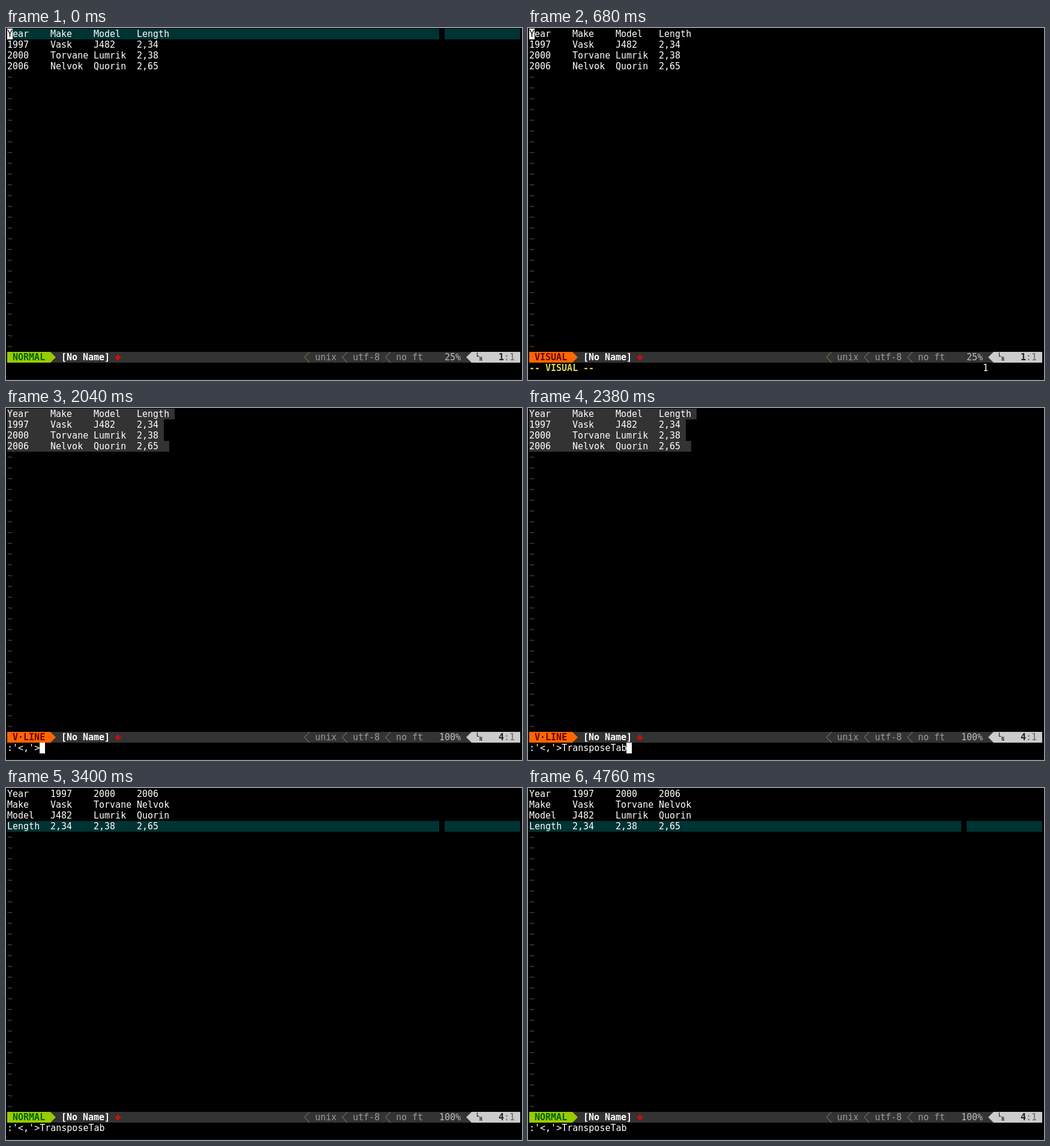
An HTML page for the animation above (5100 ms loop, 860 by 588 pixels).

```html
<!DOCTYPE html>
<html lang="en">
<head>
<meta charset="utf-8">
<title>Transpose table</title>
<style>
  html, body { margin: 0; width: 100%; height: 100%; overflow: hidden; background: #000; }
  svg { display: block; width: 860px; height: 588px; }
  text { font: 15px "DejaVu Sans Mono", monospace; fill: #fff; }
  .bold { font-weight: bold; }
  .tiny { font-size: 8px; font-weight: bold; }
</style>
</head>
<body>
<svg id="screen" viewBox="0 0 860 588"></svg>
<script>
const LOOP = 5100, CW = 9, CH = 18, STATUS = 30, CMD = 31;
const screen = document.getElementById('screen');

const table = [
  ['Year', 'Make', 'Model', 'Length'],
  ['1997', 'Vask', 'J482', '2,34'],
  ['2000', 'Torvane', 'Lumrik', '2,38'],
  ['2006', 'Nelvok', 'Quorin', '2,65']
];
const flipped = table[0].map((_, i) => table.map(row => row[i]));

const modes = {
  normal: { label: 'NORMAL', bg: '#9c0', fg: '#005f00' },
  visual: { label: 'VISUAL', bg: '#f60', fg: '#600' },
  vline: { label: 'V·LINE', bg: '#f60', fg: '#600' }
};

// Each step inherits from the one before it.
const steps = [
  { at: 0, mode: 'normal', rows: table, line: 0, cursor: [0, 0], cmd: '', count: '', selected: false },
  { at: 340, cursor: null },
  { at: 680, mode: 'visual', cursor: [0, 0], cmd: '-- VISUAL --', count: '1' },
  { at: 1020, mode: 'vline', line: 3, cursor: [0, 3], cmd: '-- VISUAL LINE --', count: '4', selected: true },
  { at: 2040, cursor: [6, CMD], cmd: ":'<,'>", count: '' },
  { at: 2380, cursor: [18, CMD], cmd: ":'<,'>TransposeTab" },
  { at: 3060, mode: 'normal', rows: flipped, cursor: [0, 3], selected: false },
  { at: 3400, cursor: null },
  { at: 4080, cursor: [0, 3] },
  { at: 4760, cursor: null }
];
for (let i = 1; i < steps.length; i++) steps[i] = { ...steps[i - 1], ...steps[i] };

const X = col => 2 + col * CW;
const Y = row => 1 + row * CH;

function add(parent, tag, attrs, content) {
  const node = document.createElementNS('http://www.w3.org/2000/svg', tag);
  for (const key in attrs) node.setAttribute(key, attrs[key]);
  if (content) node.textContent = content;
  parent.append(node);
}

function cells(g, col, row, count, fill) {
  add(g, 'rect', { x: X(col), y: Y(row), width: count * CW, height: CH, fill });
}

// Words are anchored to their own terminal column.
function write(g, col, row, str, color = '#fff', cls = '') {
  for (const m of str.matchAll(/\S+/g)) {
    add(g, 'text', { x: X(col + m.index), y: Y(row) + 14, class: cls, style: `fill:${color}` }, m[0]);
  }
}

function drawStatus(g, s) {
  const { label, bg, fg } = modes[s.mode];
  const y = Y(STATUS), mid = y + CH / 2;
  cells(g, 0, STATUS, 95, '#333');
  cells(g, 0, STATUS, 8, bg);
  add(g, 'path', { d: `M${X(8)} ${y}L${X(9)} ${mid}L${X(8)} ${y + CH}Z`, fill: bg });
  write(g, 1, STATUS, label, fg, 'bold');
  write(g, 10, STATUS, '[No Name]', '#fff', 'bold');
  add(g, 'path', { d: 'M185 546h3v3h-3zM185 552h3v3h-3zM182 549h4v3h-4zM187 549h4v3h-4z', fill: '#f00' });

  [[55, 'unix', '#a98158'], [62, 'utf-8', '#8088b8'], [70, 'no ft', '#8088b8']].forEach(([col, str, stroke]) => {
    add(g, 'path', { d: `M${X(col + 1)} ${y}L${X(col) + .5} ${mid}L${X(col + 1)} ${y + CH}`, fill: 'none', stroke });
    write(g, col + 2, STATUS, str, '#999');
  });

  write(g, 80, STATUS, (s.line ? '100%' : '25%').padStart(4), '#bcbcbc');
  cells(g, 86, STATUS, 9, '#ccc');
  add(g, 'path', { d: `M${X(86)} ${y}L${X(85)} ${mid}L${X(86)} ${y + CH}Z`, fill: '#ccc' });
  add(g, 'text', { x: 784, y: 549, class: 'tiny', style: 'fill:#222' }, 'L');
  add(g, 'text', { x: 789, y: 556, class: 'tiny', style: 'fill:#222' }, 'N');
  write(g, 91, STATUS, String(s.line + 1), '#222', 'bold');
  write(g, 92, STATUS, ':1', '#666');
}

function draw(s) {
  const g = document.createDocumentFragment();
  const lines = s.rows.map(row => row.map(v => v.padEnd(8)).join('').trimEnd());
  add(g, 'rect', { width: 860, height: 588 });
  add(g, 'rect', { y: 587, width: 860, height: 1, fill: '#0c1b24' });

  if (s.mode === 'normal') {
    cells(g, 0, s.line, 80, '#033');
    cells(g, 81, s.line, 14, '#033');
  }
  if (s.selected) {
    lines.forEach((str, i) => cells(g, 0, i, str.length + (i === 3 ? 2 : 1), '#333'));
  }
  lines.forEach((str, i) => write(g, 0, i, str));
  for (let row = 4; row < STATUS; row++) write(g, 0, row, '~', '#444');

  drawStatus(g, s);
  const message = s.cmd.startsWith('--');
  write(g, 0, CMD, s.cmd, message ? '#d2d264' : '#fff', message ? 'bold' : '');
  write(g, 84, CMD, s.count);

  if (s.cursor) {
    const [col, row] = s.cursor;
    cells(g, col, row, 1, '#fff');
    if (row < lines.length) write(g, col, row, lines[row][col], '#000');
  }
  screen.replaceChildren(g);
}

let shown;
function tick() {
  const t = performance.now() % LOOP;
  const step = steps.findLast(s => s.at <= t);
  if (step !== shown) draw(shown = step);
  requestAnimationFrame(tick);
}
tick();
</script>
</body>
</html>
```
